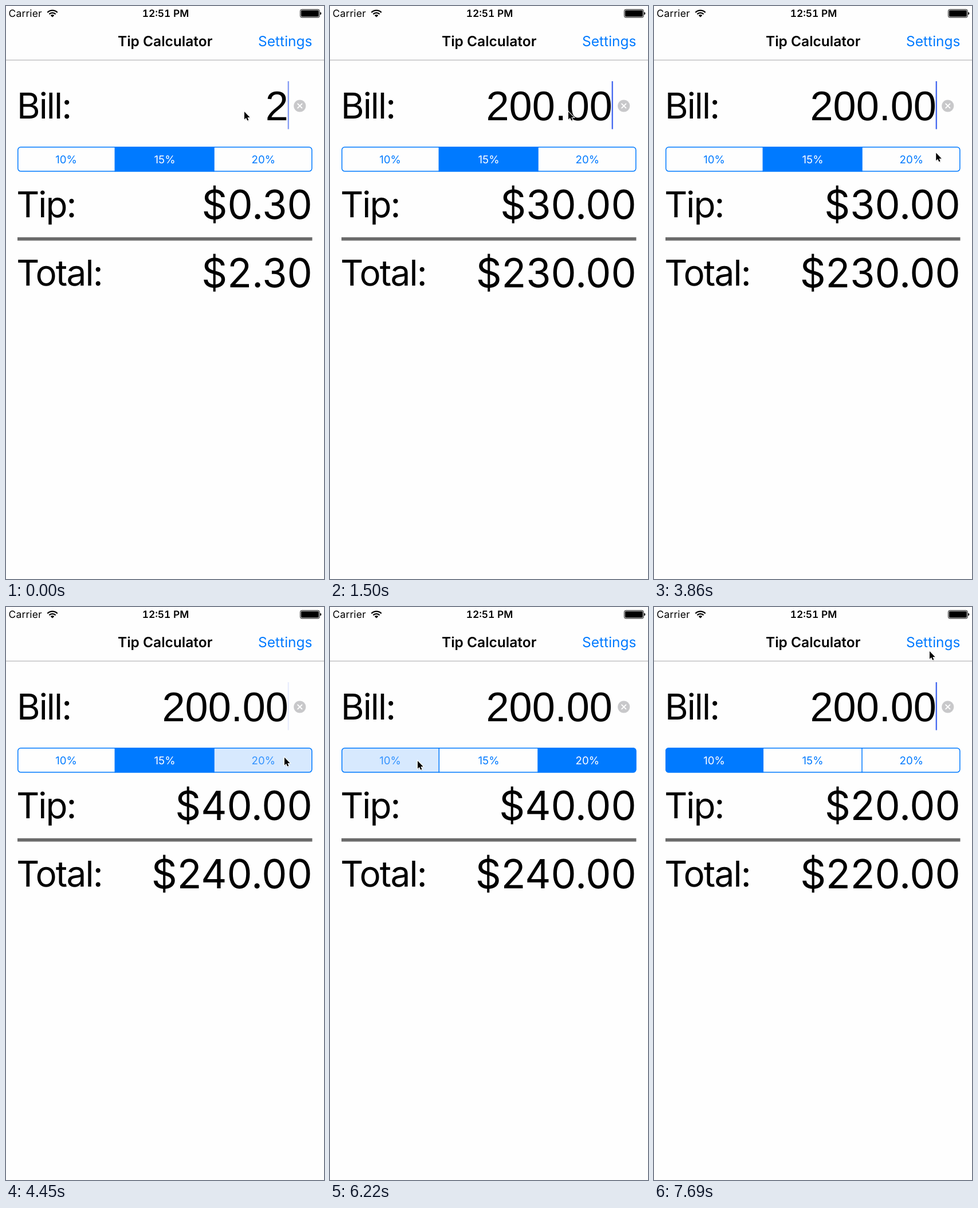
Animation, 555 px wide and 998 px high, one loop 7.99 s. Source, as an HTML page:

```html
<!DOCTYPE html>
<html lang="en">
<head>
<meta charset="utf-8">
<title>Tip Calculator</title>
<style>
  html, body { margin: 0; width: 100%; height: 100%; overflow: hidden; background: #fefefe; }
  svg { display: block; width: 555px; height: 998px; }
  text {
    font-family: Inter, Roboto, sans-serif;
    font-optical-sizing: none;
    text-rendering: geometricPrecision;
    fill: #000;
  }
  .status { font-size: 17.4px; letter-spacing: .01em; }
  .clock { font-weight: 600; font-variant-numeric: tabular-nums; letter-spacing: 0; }
  .title { font-size: 24.5px; font-weight: 600; }
  .link { font-size: 24.5px; fill: #007aff; }
  .label { font-size: 62px; letter-spacing: -.03em; }
  .amount { font-size: 70px; }
  .bill { font-family: "Liberation Sans", Arial, sans-serif; font-size: 72px; }
  .seg { font-size: 18.7px; }
  .mid { text-anchor: middle; }
  .end { text-anchor: end; }
</style>
</head>
<body>
<svg viewBox="0 0 555 998">
  <rect width="555" height="998" fill="#fefefe"/>

  <text class="status" x="4.6" y="19.2">Carrier</text>
  <g fill="none" stroke="#000" stroke-width="2.3">
    <path d="M72.3 11.2A12.3 12.3 0 0 1 89.7 11.2"/>
    <path d="M75.4 14.3A7.9 7.9 0 0 1 86.6 14.3"/>
  </g>
  <path d="M81 19.6L77.8 16.4A4.6 4.6 0 0 1 84.2 16.4Z"/>
  <text class="status clock mid" x="278.5" y="19.2">12:51 PM</text>
  <rect x="513.6" y="6.1" width="33.6" height="13.8" rx="2.6" fill="none" stroke="#000" stroke-width="1"/>
  <rect x="515" y="7.5" width="30.8" height="11" rx="1.4"/>
  <path d="M548.3 10.6Q550.4 11 550.4 13T548.3 15.4Z"/>

  <text class="title mid" x="277.7" y="69.5">Tip Calculator</text>
  <text class="link end" x="534.5" y="69.5">Settings</text>
  <rect y="93.6" width="555" height="1.2" fill="#b4b4b6"/>

  <text class="label" x="19" y="196.2">Bill:</text>
  <text class="label" x="18.2" y="367.9">Tip:</text>
  <text class="label" x="18.2" y="486.7">Total:</text>
  <rect x="20" y="402.8" width="514.5" height="5.8" fill="#6a6a6a"/>

  <text id="bill" class="bill end" x="492.8" y="199.4"></text>
  <text id="tip" class="amount end" x="534.6" y="370.6"></text>
  <text id="total" class="amount end" x="534.6" y="489.5"></text>
  <rect id="caret" x="491.6" y="131" width="2.4" height="83.5" fill="#4a6cf0"/>
  <circle cx="512.8" cy="174" r="10.6" fill="#c8c8ca"/>
  <path d="M508.6 169.8l8.4 8.4m0-8.4l-8.4 8.4" stroke="#fff" stroke-width="1.9"/>

  <clipPath id="round"><rect x="20" y="245" width="514.6" height="43.6" rx="5.5"/></clipPath>
  <g id="segments" clip-path="url(#round)"></g>
  <g fill="none" stroke="#007aff" stroke-width="1.5">
    <rect x="20.75" y="245.75" width="513.1" height="42.1" rx="5"/>
    <path d="M190.3 245V288.6M363 245V288.6"/>
  </g>
  <g id="labels"></g>

  <g id="cursor">
    <path d="M1 2V15.5L4 12.7L6.2 17.4L8.4 16.4L6.3 11.8H10.6Z" fill="#000" opacity=".16"/>
    <path d="M0 0V13.5L3 10.7L5.2 15.5L7.4 14.5L5.3 9.9H9.6Z"
      stroke="#fff" stroke-width="2" paint-order="stroke"/>
  </g>
</svg>
<script>
const LOOP = 7990;
const BLUE = "#007aff";
const $ = id => document.getElementById(id);
const clamp = v => Math.max(0, Math.min(1, v));

// The screen refreshes in steps of roughly 148 ms.
const stepAt = t => t < 2091 ? Math.min(13, Math.floor(t / 150))
                             : 14 + Math.floor((t - 2091) / 147.25);
const timeOf = k => k < 15 ? k * 150 : 2093 + (k - 14) * 147.25;

const typing = [[0, 1], [1, 2], [2, 3], [5, 4], [9, 5], [10, 6]];
const path = [
  [23, 526, 222], [27, 486, 262], [30, 486, 262], [34, 304, 266],
  [36, 262, 267], [41, 153, 268], [44, 153, 268], [52, 481, 77]
];

function make(tag, parent, attrs) {
  const el = document.createElementNS("http://www.w3.org/2000/svg", tag);
  for (const name in attrs) el.setAttribute(name, attrs[name]);
  parent.append(el);
  return el;
}

const edges = [20, 190, 363, 535];
const rates = [10, 15, 20];
const segments = rates.map((rate, i) => {
  const box = make("rect", $("segments"), {
    x: edges[i], y: 245, width: edges[i + 1] - edges[i], height: 44
  });
  const label = make("text", $("labels"), {
    class: "seg mid", x: [105, 277, 449.3][i], y: 273.5
  });
  label.textContent = rate + "%";
  return { box, label };
});

function caretAlpha(k) {
  if (k === 0) return 0.65;
  if (k < 14) return 1;
  const phase = (timeOf(k) - 2060) % 970;
  return phase < 300 ? 1 - clamp(phase / 160) : clamp((phase - 430) / 170);
}

function cursorAt(k) {
  if (k < 14) return [416, 184];
  if (k < path[0][0]) return null;
  const i = path.findIndex(p => p[0] > k);
  if (i < 0) return path[path.length - 1].slice(1);
  const [k0, x0, y0] = path[i - 1], [k1, x1, y1] = path[i];
  const u = (k - k0) / (k1 - k0), s = u * u * (3 - 2 * u);
  return [x0 + (x1 - x0) * s, y0 + (y1 - y0) * s];
}

function paintSegments(selected, pressed) {
  segments.forEach(({ box, label }, i) => {
    const on = i === selected, down = i === pressed;
    box.setAttribute("fill", on ? BLUE : down ? "#d7e9fe" : "#fefefe");
    label.style.fill = on ? "#fff" : down ? "#3393ff" : BLUE;
  });
}

function draw(t) {
  const k = stepAt(t);
  const count = typing.filter(p => p[0] <= k).pop()[1];
  const bill = "200.00".slice(0, count);
  const rate = rates[k < 30 ? 1 : k < 43 ? 2 : 0];
  const tip = parseFloat(bill) * rate / 100;

  $("bill").textContent = bill;
  $("tip").textContent = "$" + tip.toFixed(2);
  $("total").textContent = "$" + (parseFloat(bill) + tip).toFixed(2);
  $("caret").setAttribute("opacity", caretAlpha(k));

  const selected = k < 31 ? 1 : k < 44 ? 2 : 0;
  const pressed = k === 29 || k === 30 ? 2 : k === 42 || k === 43 ? 0 : -1;
  paintSegments(selected, pressed);

  const at = cursorAt(k);
  $("cursor").setAttribute("visibility", at ? "visible" : "hidden");
  if (at) $("cursor").setAttribute("transform", `translate(${at[0]} ${at[1]})`);
}

const start = performance.now();
function tick() {
  draw((performance.now() - start) % LOOP);
  requestAnimationFrame(tick);
}
tick();
</script>
</body>
</html>
```
